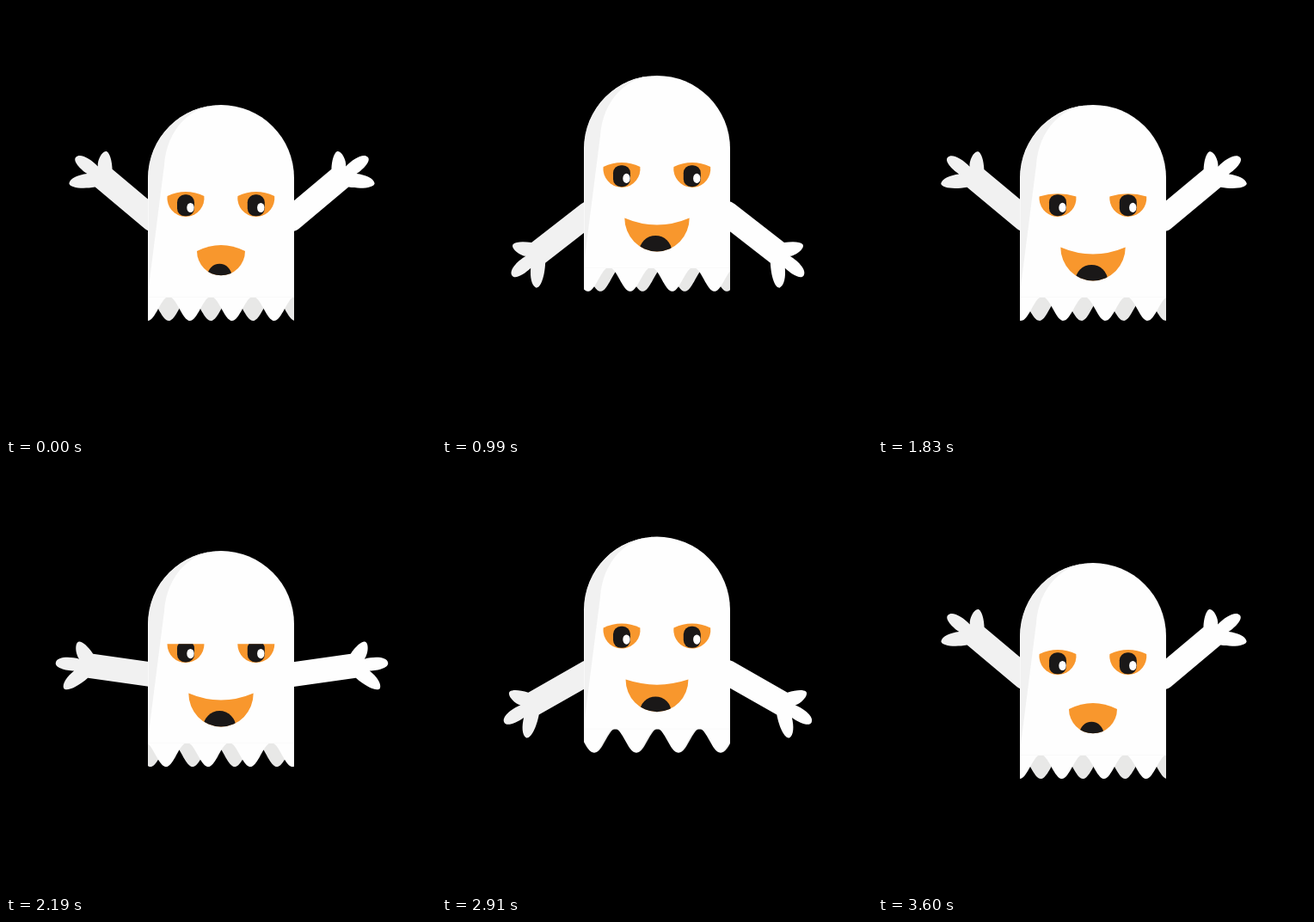
An HTML page with a canvas for the animation above (3.63 s loop, 500 px wide and 500 px high).

```html
<!DOCTYPE html>
<html lang="en">
<head>
<meta charset="utf-8">
<title>Floating ghost</title>
<style>
html, body { margin: 0; width: 100%; height: 100%; overflow: hidden; background: #000; }
canvas { display: block; width: 500px; height: 500px; }
</style>
</head>
<body>
<canvas id="stage" width="500" height="500"></canvas>
<script>
const ctx = document.getElementById('stage').getContext('2d');
const LOOP = 3630, CYCLE = 3600, BOB = 1800;
const WHITE = '#fefefe', SHADE = '#f1f1f1', BACK = '#e8e8e7', ORANGE = '#f8972d', DARK = '#1a1818';
const LEFT = 165, RIGHT = 335, HEM = 223, WAVE = 49;

const ARM = new Path2D(`M-5 -14.3 L68 -14.3 C75 -22 82 -26.5 86 -26 C91 -25 89 -12 83 -6
  C95 -7.5 109 -5 109.5 2 C110 8 97 9.5 87 8.5 C94 16 99 25 96 30.5 C92 34 80 26 70 14.3
  L-5 14.3 A14.3 14.3 0 0 1 -5 -14.3 Z`);
const BODY = new Path2D('M165 224 V85 A85 85 0 0 1 335 85 V224 Z');
const SIDE = new Path2D('M250 0 C215 0 187 28 184 70 L165.5 215 V85 A85 85 0 0 1 250 0 Z');

const ease = u => (1 - Math.cos(Math.PI * Math.min(1, Math.max(0, u)))) / 2;
const mix = (a, b, p) => a + (b - a) * p;
const blink = (t, mid) => ease(1 - Math.abs(t - mid) / 256);

function fill(color, path) {
  ctx.fillStyle = color;
  path ? ctx.fill(path) : ctx.fill();
}

function ellipse(x, y, rx, ry, color) {
  ctx.beginPath();
  ctx.ellipse(x, y, rx, ry, 0, 0, 2 * Math.PI);
  fill(color);
}

function arm(x, side, angle, color) {
  ctx.save();
  ctx.translate(x, 244.5);
  ctx.scale(side, 1);
  ctx.rotate(angle);
  fill(color, ARM);
  ctx.restore();
}

// Scalloped strip whose lobes hang lowest at x = peak + n * WAVE
function hem(peak, color) {
  ctx.beginPath();
  ctx.moveTo(LEFT, HEM);
  for (let x = LEFT; x <= RIGHT; x++) {
    ctx.lineTo(x, HEM + 14 + 14 * Math.cos(2 * Math.PI * (x - peak) / WAVE));
  }
  ctx.lineTo(RIGHT, HEM);
  fill(color);
}

function eye(x, shut) {
  const r = 21.5, cy = 108.5;
  const lid = mix(106, 113, shut), bend = mix(-5, 10, shut);
  const a = Math.asin((lid - cy) / r), w = r * Math.cos(a);
  ctx.save();
  ctx.translate(x, 0);
  ctx.beginPath();
  ctx.arc(0, cy, r, a, Math.PI - a);
  ctx.quadraticCurveTo(0, lid + 2 * bend, w, lid);
  fill(ORANGE);
  ctx.clip();
  ctx.beginPath();
  ctx.roundRect(-10, 104.3, 20, 25, 9);
  fill(DARK);
  ellipse(5.5, 119.5, 4.2, 5.6, '#fff');
  ctx.restore();
}

function mouth(open) {
  const w = mix(28, 37.7, open), y = mix(170, 165.5, open);
  const top = mix(163, 173.5, open), low = mix(198.3, 204.5, open);
  ctx.save();
  ctx.beginPath();
  ctx.ellipse(250, y, w, low - y, 0, 0, Math.PI);
  ctx.quadraticCurveTo(250, 2 * top - y, 250 + w, y);
  fill(ORANGE);
  ctx.clip();
  const r = mix(14, 19, open);
  ellipse(248.3, low + 0.5, r, r, DARK);
  ctx.restore();
}

function draw(t) {
  const swing = Math.cos(2 * Math.PI * t / BOB);
  const angle = -swing * 40 * Math.PI / 180;
  const slide = WAVE * t / 900;

  ctx.fillStyle = '#000';
  ctx.fillRect(0, 0, 500, 500);
  arm(166.5, -1, angle, SHADE);
  arm(335.5, 1, angle, WHITE);

  ctx.save();
  ctx.translate(0, 97.5 + 17.5 * swing);
  hem(42.25 - slide, BACK);
  hem(17.75 + slide, WHITE);
  fill(WHITE, BODY);
  fill(SHADE, SIDE);
  ctx.fillStyle = 'rgba(0,0,0,.02)';
  ctx.fillRect(LEFT, HEM, RIGHT - LEFT, 1);
  const shut = Math.max(blink(t, 600), blink(t, 2034));
  eye(209, shut);
  eye(290.8, shut);
  mouth(Math.min(ease(t / 900), ease((CYCLE - t) / 900)));
  ctx.restore();
}

const start = performance.now();
function tick() {
  draw(Math.min((performance.now() - start) % LOOP, CYCLE));
  requestAnimationFrame(tick);
}
tick();
</script>
</body>
</html>
```
